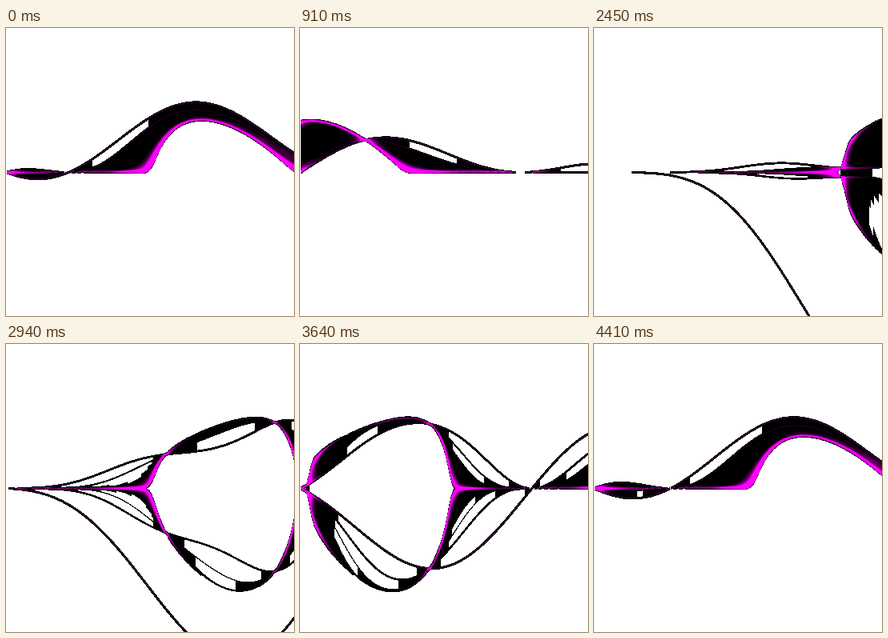
An HTML page with a canvas that plays this animation: 360x360 px, repeating every 4.48 s.

```html
<!DOCTYPE html>
<html lang="en">
<head>
<meta charset="utf-8">
<title>Iterated sine map</title>
<style>
  html, body { margin: 0; width: 100%; height: 100%; overflow: hidden; background: #fff; }
  canvas { display: block; width: 360px; height: 360px; }
</style>
</head>
<body>
<canvas id="stage" width="360" height="360"></canvas>
<script>
const SIZE = 360, MID = 180, STEP_MS = 70, STEPS = 64, PHASE = -0.43;
const MIN_ITER = 10, MAX_ITER = 60, SETTLED = 0.0003, NEAR_ZERO = 0.0005;
const RADIUS = 2.4, VISIBLE = 0.35;
const ctx = document.getElementById('stage').getContext('2d');
const image = ctx.createImageData(SIZE, SIZE);
const density = new Float32Array(SIZE);
const filled = new Uint8Array(SIZE);

// Orbit of one column in pixels, ending once it repeats with period 1 or 2.
// Values that have collapsed to zero leave no mark.
function orbit(x, phi) {
  const s = Math.sin(phi);
  const map = y => s * Math.sin(y) * (1 + Math.cos(phi + y));
  const points = [];
  let y = map(x / SIZE);
  for (let n = 0; n < MAX_ITER; n++) {
    const next = map(y);
    if (n >= MIN_ITER && Math.abs(map(next) - y) < SETTLED) break;
    if (Math.abs(y) > NEAR_ZERO) points[n] = MID - MID * y;
    y = next;
  }
  return points;
}

// Early iterates show alone, later ones only where several overlap.
function addPoint(y, n, slope) {
  const half = RADIUS * Math.hypot(1, Math.min(2, slope));
  const weight = Math.max(0.33, 1 - 0.13 * n);
  const last = Math.min(SIZE - 1, Math.floor(y + half));
  for (let r = Math.max(0, Math.ceil(y - half)); r <= last; r++) {
    density[r] += weight * (1 - Math.abs(r - y) / half);
  }
}

// Neighbouring orbit points that lie close together merge into a dark body.
function fillGaps(points, limit) {
  const sorted = points.filter(isFinite).sort((a, b) => a - b);
  for (let i = 1; i < sorted.length; i++) {
    const top = sorted[i - 1], bottom = sorted[i];
    if (bottom - top > limit) continue;
    const last = Math.min(SIZE - 1, bottom);
    for (let r = Math.max(0, Math.ceil(top)); r <= last; r++) filled[r] = 1;
  }
}

// Orbits that leave zero fill more densely than those that decay to it.
function gapLimit(phi) {
  const growth = Math.abs(Math.sin(phi) * (1 + Math.cos(phi)));
  return growth > 1 ? 12 : 7 + 5 * Math.sin(phi + 0.8);
}

function draw(step) {
  const shift = PHASE + step * 2 * Math.PI / STEPS;
  const px = image.data;
  let before = [];
  for (let x = 0; x < SIZE; x++) {
    const phi = shift + x / 180;
    const points = orbit(x, phi);
    density.fill(0);
    filled.fill(0);
    points.forEach((y, n) => {
      addPoint(y, n, n in before ? Math.abs(y - before[n]) : 0);
    });
    fillGaps(points, gapLimit(phi));
    for (let r = 0; r < SIZE; r++) {
      const i = (r * SIZE + x) * 4;
      const inked = filled[r] || density[r] > VISIBLE;
      const glow = 255 * Math.max(0, Math.min(1, (density[r] - 0.6) / 1.5));
      px[i] = px[i + 2] = inked ? glow : 255;
      px[i + 1] = inked ? 0 : 255;
      px[i + 3] = 255;
    }
    before = points;
  }
  ctx.putImageData(image, 0, 0);
}

const start = performance.now();
let shown = -1;
function tick() {
  const step = Math.floor((performance.now() - start) / STEP_MS) % STEPS;
  if (step !== shown) draw(shown = step);
  requestAnimationFrame(tick);
}
tick();
</script>
</body>
</html>
```
